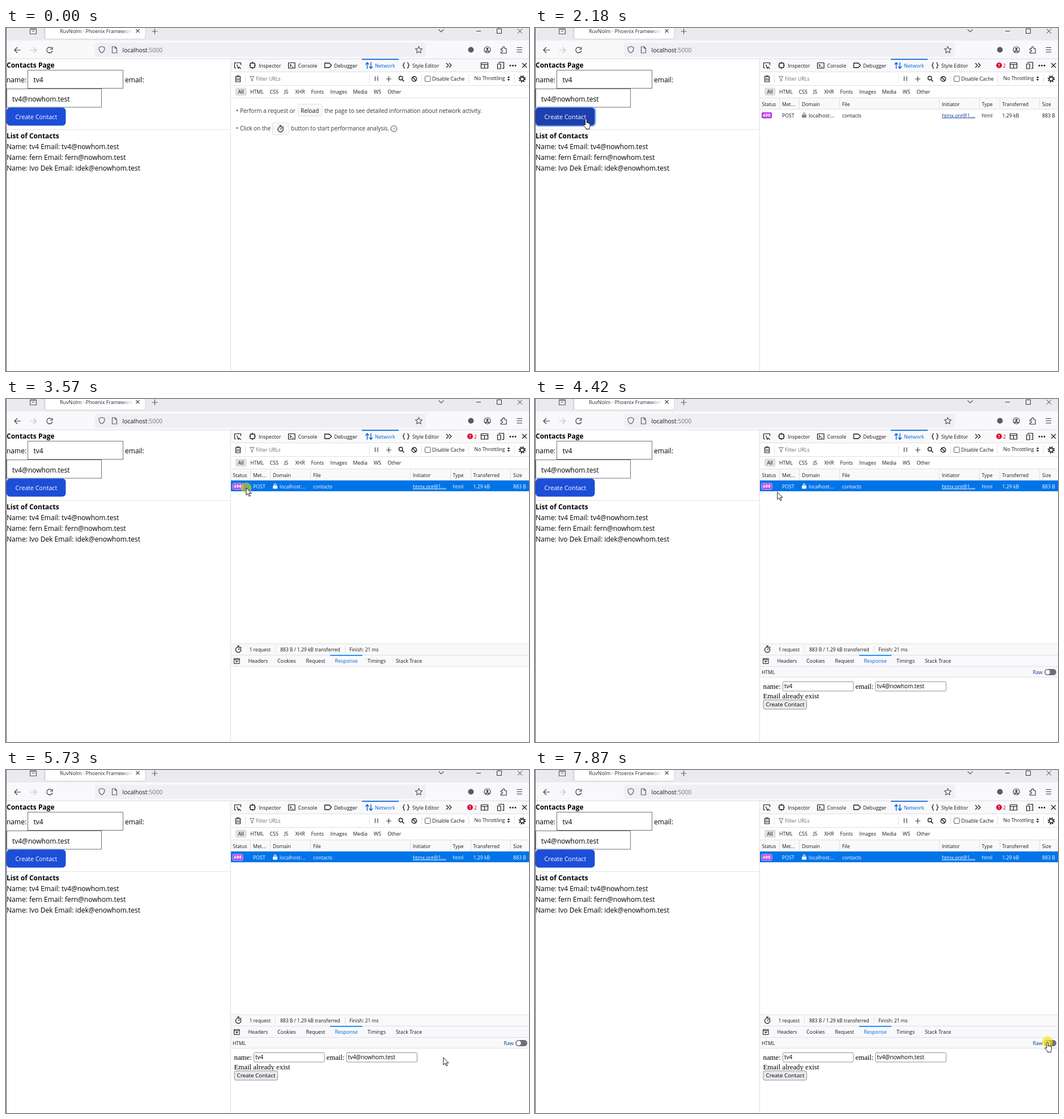
These frames come from a looping animation (923 by 606 pixels, 8000 ms). An HTML page:

```html
<!DOCTYPE html>
<html lang="en">
<head>
<meta charset="utf-8">
<title>Contacts form</title>
<style>
html, body { margin: 0; width: 100%; height: 100%; overflow: hidden; background: #fff; }
svg { display: block; width: 923px; height: 606px; font-family: "Open Sans", "Noto Sans", sans-serif; }
text { white-space: pre; }
</style>
</head>
<body>
<svg id="stage" viewBox="0 0 923 606"></svg>
<script>
const INK = '#18181a', ICON = '#3a3a44', LINE = '#e0e0e2', BLUE = '#0060df', BAR = '#f9f9fb';
const MAIL = 'tv4@nowhom.test';

const text = (x, y, s, size = 8.8, fill = INK, more = '') =>
  `<text x="${x}" y="${y}" font-size="${size}" ${fill && `fill="${fill}"`} ${more}>${s}</text>`;
const rect = (x, y, w, h, fill, more = '') =>
  `<rect x="${x}" y="${y}" width="${w}" height="${h}" fill="${fill}" ${more}/>`;
const box = (x, y, w, h, stroke, fill = '#fff', r = 0) =>
  rect(x + .5, y + .5, w - 1, h - 1, fill, `stroke="${stroke}" rx="${r}"`);
const path = (d, stroke = ICON, width = 1.2, fill = 'none') =>
  `<path d="${d}" fill="${fill}" stroke="${stroke}" stroke-width="${width}" stroke-linejoin="round"/>`;
const ring = (x, y, r, stroke = ICON, width = 1.2) =>
  `<circle cx="${x}" cy="${y}" r="${r}" fill="none" stroke="${stroke}" stroke-width="${width}"/>`;
const dot = (x, y, r, fill) => `<circle cx="${x}" cy="${y}" r="${r}" fill="${fill}"/>`;
const hline = (x, y, w, fill = LINE) => rect(x, y, w, 1, fill);
const vline = (x, y, h, fill = LINE) => rect(x, y, 1, h, fill);
const labels = (y, items, size, fill) => items.map(([x, s]) => text(x, y, s, size, fill)).join('');
const group = (id, ...parts) => `<g id="${id}">${parts.join('')}</g>`;
const stopwatch = (x, y) => ring(x, y, 4.6, INK, 1.3) +
  path(`M${x - 2} ${y - 6.5}h4M${x} ${y}l2-2M${x + 4} ${y - 5}l1.2 1.2`, INK, 1.3);

const chrome = [
  rect(0, 0, 923, 22, '#ebebef'),
  rect(0, 22, 923, 32, BAR),
  hline(0, 54, 923, '#dcdce0'),
  vline(67, 0, 20, '#cfcfd8'),
  rect(69, -9, 177, 28.5, '#fff', 'rx="4" stroke="#c9c9d2" stroke-width=".8"'),
  '<defs><linearGradient id="fade"><stop offset="0" stop-color="#fff" stop-opacity="0"/><stop offset="1" stop-color="#fff"/></linearGradient></defs>',
  text(95, 9, 'RuvNolm · Phoenix Framework', 9, '#2a2a33'),
  rect(204, 0, 20, 14, 'url(#fade)'), rect(224, 0, 4, 14, '#fff'),
  path('M229.5 2.2l6 6m0-6l-6 6'),
  path('M42.5 2.5h11v8h-11zM42 1h12M46 5.5h4', '#5b5b66'),
  path('M262.5 1v10m-5-5h10', '#5b5b66'),
  path('M763.5 2.5l4.5 4.5 4.5-4.5', '#5b5b66'),
  path('M830 5.5h8M866.5 1.5h8v8h-8zM903 1.5l8 8m0-8l-8 8', '#333', 1),
  rect(157, 26, 584, 25, '#f0f0f4', 'rx="4"'),
  path('M26 39h-11m5-5l-5 5 5 5'),
  path('M42.5 39h11m-5-5l5 5-5 5', '#c2c2c9'),
  path('M81 36a5 5 0 1 0 .8 4M82 33.5v4h-4'),
  path('M169 32.5l5 2q.3 7-5 9.5-5.300-2.500-5-9.500z', '#5b5b66'),
  path('M187.500 33h5l3 3v8h-8zM192.500 33v3h3', '#5b5b66'),
  text(205.500, 43, 'localhost<tspan fill="#77777f">:5000</tspan>', 10.500, '#18181f'),
  path('M728.500 32.500l1.800 3.900 4.200.500-3.100 2.900.900 4.200-3.800-2.100-3.800 2.100.900-4.200-3.100-2.900 4.200-.500z', '#5b5b66'),
  dot(820.500, 38.500, 5, '#5b5b66'),
  ring(849.500, 38.500, 5.500), dot(849.500, 37, 2, ICON), path('M846 42q3.500-3 7 0', ICON, 1.800),
  path('M873.500 36.500h3v-1.500a1.800 1.800 0 0 1 3.600 0v1.500h3v8h-9.600v-2.500h1.500a1.500 1.500 0 0 0 0-3h-1.500z'),
  path('M901.500 34.500h9.500m-9.500 4h9.500m-9.500 4h9.500')
].join('');

const page = [
  rect(0, 55, 396, 551, '#fff'),
  text(1, 70, 'Contacts Page', 12, '#000', 'font-weight="700"'),
  text(1, 96, 'name:', 12, '#000'), text(210, 96, 'email:', 12, '#000'),
  box(38, 74, 169, 33, '#6b7280'), text(48.500, 96, 'tv4', 12, '#000'),
  box(1, 107, 168, 33.500, '#6b7280'), text(11, 129.500, MAIL, 12, '#000'),
  group('focus', rect(-1, 138.500, 109, 36, '#93c5fd', 'rx="8"')),
  rect(1, 140.500, 104.500, 32, '#1d4ed8', 'rx="6" id="create"'),
  text(16.500, 161, 'Create Contact', 10.700, '#fff'),
  hline(1, 179, 395, '#e4e4e7'),
  text(1, 194.500, 'List of Contacts', 12, '#000', 'font-weight="700"'),
  ...[['tv4', MAIL], ['fern', 'fern@nowhom.test'], ['Ivo Dek', 'idek@enowhom.test']].map(([name, mail], k) =>
    text(1, 213.500 + 19.100 * k, `Name: ${name} Email: ${mail}`, 12, '#000')),
  vline(0, 0, 606, '#5a5a60')
].join('');

const tools = [
  rect(396, 55, 527, 23, BAR), hline(396, 77, 527),
  rect(396, 78, 527, 46, '#fff'), hline(396, 101, 527), hline(396, 123, 527),
  rect(628, 54.500, 65, 1.700, BLUE),
  path('M406 70.500h-2.500v-9h11v4M407.500 64.500l2.500 7 1.500-2.500 3 3', INK),
  rect(431, 62, 8, 8, 'none', `rx="1" stroke="${INK}" stroke-width="1.400"`),
  path('M435 59.500v2.500m0 8v2.500m-6-6.500h2m8 0h2', INK),
  path('M498.500 61.500h11.500v9.500h-11.500zM501 64l2.500 2.300-2.500 2.300M504.500 69h3', INK),
  path('M562.500 62h8l4 4-4 4h-8z', INK, 1.300),
  path('M637.500 72v-11m-3 3.500l3-3.500 3 3.500M644 60.500v11m-3-3.500l3 3.500 3-3.500', BLUE, 1.400),
  path('M704 61q-2 0-2 2v1.500l-1.500 1.500 1.500 1.500v1.500q0 2 2 2M708 61q2 0 2 2v1.500l1.500 1.500-1.500 1.500v1.500q0 2-2 2', INK),
  labels(69.700, [[446, 'Inspector'], [515.500, 'Console'], [579, 'Debugger'], [717, 'Style Editor']], 9),
  text(651, 69.700, 'Network', 9, BLUE),
  path('M777 62l4 4-4 4M782 62l4 4-4 4', INK),
  path('M838.500 61.500h12v9.500h-12zM838.500 64.500h12M844.500 64.500v6.500', INK),
  path('M870 62v-1.500h8.500v11h-3M867.500 63.500h5.500v8.500h-5.500z', INK),
  ...[890, 894.500, 899].map(x => dot(x, 66.500, 1.400, INK)),
  path('M911 62l8 8m0-8l-8 8', INK),

  path('M404.500 86h10M407.500 86v-1.500h4v1.500M405.500 86v9h8v-9M408 88.500v4.500m3-4.500v4.500', INK),
  vline(422, 82, 15), vline(641, 82, 15), vline(733, 82, 15), vline(816, 82, 15), vline(897, 82, 15),
  path('M430.500 85.500h7.500l-2.800 4v4.500l-1.900-1v-3.500z', '#6b7b7b', 1),
  text(441, 93, 'Filter URLs', 8.800, '#607070'),
  path('M651.500 85.500v8m4.500-8v8M675.500 85.500v9m-4.500-4.500h9', ICON),
  ring(696.700, 88.500, 3.200, INK, 1.400), path('M699 91l3.500 3.500', INK, 1.500),
  ring(720.500, 90, 4.200, INK, 1.400), path('M717.500 87l6 6', INK, 1.400),
  box(739, 84.500, 10.500, 10.500, '#5b5b66', '#fff', 1.500),
  text(752, 93, 'Disable Cache'), text(826.500, 92.300, 'No Throttling', 8.800),
  path('M885 88l2-2.500 2 2.500zM885 90.500l2 2.500 2-2.500z', INK, .5, INK),
  ring(911, 90, 3.400, INK, 1.600),
  `<circle cx="911" cy="90" r="5.200" fill="none" stroke="${INK}" stroke-width="2" stroke-dasharray="2 2.084"/>`,
  rect(405, 105.500, 19.500, 14, '#dedee3', 'rx="2"'),
  labels(116, [[409.500, 'All'], [431, 'HTML'], [465.500, 'CSS'], [491, 'JS'], [510.500, 'XHR'], [538.500, 'Fonts'],
    [572.500, 'Images'], [612.500, 'Media'], [649, 'WS'], [673.500, 'Other']])
].join('');

const hint = group('hint',
  labels(149.500, [[406, '•'], [413, 'Perform a request or'], [562, 'the page to see detailed information about network activity.']], 10, '#38383d'),
  labels(180.500, [[406, '•'], [413, 'Click on the'], [503, 'button to start performance analysis.']], 10, '#38383d'),
  box(515, 134, 43, 22, LINE, BAR, 2), text(520, 149.500, 'Reload', 10),
  box(470, 167, 29, 22, LINE, BAR, 2), stopwatch(484.500, 179),
  ring(684.500, 178, 5.300, ICON, 1), text(682.600, 181, '?', 8, ICON));

const columns = [431, 466, 537, 713, 784, 820, 890];
const table = group('table',
  dot(819, 66, 5, '#d7002f'), path('M819 63v3.500m0 1.200v1.400', '#fff', 1.400),
  text(826, 69.500, '2', 8.800, '#c50042'),
  rect(397, 124, 526, 19, BAR), hline(397, 143, 526),
  columns.map(x => vline(x, 124, 19)).join(''),
  labels(137.500, [[400.500, 'Status'], [436, 'Met...'], [471, 'Domain'], [542, 'File'], [718, 'Initiator'],
    [788.500, 'Type'], [824.500, 'Transferred'], [895, 'Size']], 8.600),
  rect(397, 144, 526, 19, '#fff', 'id="rowBack"'),
  rect(400, 149, 18, 10.500, '#b833e1', 'rx="2" id="badge"'),
  text(401.500, 157.300, '400', 8, '#fff', 'font-family="Noto Sans Mono, monospace" font-weight="700"'),
  group('row',
    labels(157.500, [[436, 'POST'], [483, 'localhost:...'], [542, 'contacts'], [788.500, 'html'], [824.500, '1.29 kB'], [895, '883 B']], 8.700, '')),
  text(718, 157.500, 'htmx.org@1....', 8.700, '', 'id="link" text-decoration="underline"'),
  group('lock', '<rect x="471" y="153" width="8" height="5.500" rx="1"/>',
    '<path d="M472.800 153v-1.500a2.200 2.200 0 0 1 4.400 0v1.500h-1.200v-1.500a1 1 0 0 0-2 0v1.500z" stroke-width=".4"/>'));

const panel = group('panel',
  rect(397, 432, 526, 174, '#fff'),
  rect(397, 433, 526, 39, BAR), hline(397, 432, 526), hline(397, 452, 526), hline(397, 472, 526),
  stopwatch(410, 443),
  labels(446.300, [[429.500, '1 request'], [484, '883 B / 1.29 kB transferred'], [606, 'Finish: 21 ms']], 8.500),
  vline(475, 436, 13), vline(598, 436, 13),
  path('M402.500 458.500h9.500v9h-9.500zM402.500 460.500h9.500M405.300 463l2 2.300 2-2.300z', INK, 1),
  rect(572, 452, 57, 1.800, '#0a84ff'),
  labels(466.300, [[427.500, 'Headers'], [479, 'Cookies'], [529.500, 'Request'], [638, 'Timings'], [688, 'Stack Trace']], 8.900),
  text(580.500, 466.300, 'Response', 8.900, BLUE));

const serif = 'font-family="Liberation Serif, Times New Roman, serif"';
const reply = group('reply',
  rect(397, 473, 526, 18, BAR), hline(397, 491, 526),
  text(400, 486.300, 'HTML', 8.600), text(878.500, 486.300, 'Raw', 8.800, '#0b3a91'),
  rect(899, 477, 21, 11, '#6f6f78', 'rx="5.500"'), dot(904.700, 482.500, 4, '#fff'),
  text(402.500, 512, 'name:', 12.800, '#000', serif), text(565.500, 512, 'email:', 12.800, '#000', serif),
  box(437, 499, 125.500, 17.500, '#8f8f9d', '#fff', 2), text(440, 511.300, 'tv4', 9.900, '#000'),
  box(600.500, 499, 125.500, 17.500, '#8f8f9d', '#fff', 2), text(603.500, 511.300, MAIL, 9.900, '#000'),
  text(402.500, 528.500, 'Email already exist', 12.800, '#000', serif),
  rect(403, 531.500, 76.500, 16.500, '#e9e9ed', 'rx="3" stroke="#8f8f9d" id="send"'),
  text(407.500, 543.300, 'Create Contact', 9.850, '#000'));

const pointer = '<circle id="click" r="9.500" fill="#f5e600"/>' +
  group('arrow', path('M0 0V13L3 10.200 5.200 15 7.200 14.100 5 9.500H9.200Z', '#000', .9, '#fff')) +
  group('hand', path('M-1.500 11V1.700a1.400 1.400 0 0 1 2.800 0V7q1.900-.800 2.300.6 1.400-.600 1.800.6 1.700-.400 1.700 1.300V13q0 2-1 3.200V18H0v-1.500L-4.300 11.800q-.600-1.900 1.200-1.600z', '#000', .9, '#fff'));

document.getElementById('stage').innerHTML =
  rect(0, 0, 923, 606, '#fff') + chrome + page + tools + hint + table + panel + reply +
  vline(396, 55, 551) + pointer;

const el = id => document.getElementById(id);
const show = (id, on) => el(id).setAttribute('display', on ? 'inline' : 'none');
const set = (id, name, value) => el(id).setAttribute(name, value);

// time, x, y of the pointer tip
const track = [
  [1060, 574, 500], [1250, 440, 398], [1450, 235, 255], [1600, 122, 180], [1700, 90, 160.500], [2580, 90, 160.500],
  [2800, 205, 161], [3110, 391, 160], [3360, 422, 157], [3430, 424, 157], [4350, 424, 157], [4420, 427.500, 163],
  [4580, 470, 400], [4720, 425, 525], [4900, 552, 538], [5120, 450, 533], [5520, 450, 533],
  [5730, 771.500, 508], [5860, 816, 503], [6200, 816, 503], [6500, 880, 480], [6800, 903, 483],
  [7130, 903, 483], [7470, 904.500, 480.500], [8000, 904.500, 480.500]
];

function place(t) {
  const k = Math.max(1, track.findIndex(p => p[0] > t));
  const [a, b] = [track[k - 1], track[k]];
  const u = Math.max(0, (t - a[0]) / (b[0] - a[0]));
  return [a[1] + (b[1] - a[1]) * u, a[2] + (b[2] - a[2]) * u];
}

function draw(t) {
  const [x, y] = place(t);
  const over = (l, top, r, bottom) => t >= 1060 && x >= l && x <= r && y >= top && y <= bottom;
  const onCreate = over(1, 140, 105.500, 172.500);
  const hand = onCreate || over(899, 477, 920, 488);
  const picked = t >= 3570;
  const clicking = t >= 1900 && t < 2110 || picked && t < 3700 || t >= 7870;

  show('hint', t < 2040);
  show('table', t >= 2040);
  show('panel', picked);
  show('reply', t >= 3640);
  show('focus', t >= 1900 && !picked);
  set('create', 'fill', onCreate ? '#1e40af' : '#1d4ed8');
  set('send', 'fill', over(403, 531, 480, 548) ? '#d0d0d7' : '#e9e9ed');

  set('rowBack', 'fill', picked ? '#0074e8' : over(397, 144, 923, 163) ? '#f0f0f4' : '#fff');
  set('row', 'fill', picked ? '#fff' : INK);
  set('link', 'fill', picked ? '#fff' : '#0b3a91');
  set('lock', 'fill', picked ? '#fff' : '#8f8590');
  set('badge', 'stroke', picked ? '#e6c8f5' : 'none');

  show('arrow', t >= 1060 && !hand);
  show('hand', hand);
  show('click', clicking);
  set('click', 'fill-opacity', picked && t < 3700 ? .52 : .65);
  for (const id of ['arrow', 'hand', 'click']) set(id, 'transform', `translate(${x} ${y})`);
}

const start = performance.now();
function tick(now) {
  draw(Math.max(0, now - start) % 8000);
  requestAnimationFrame(tick);
}
draw(0);
requestAnimationFrame(tick);
</script>
</body>
</html>
```
